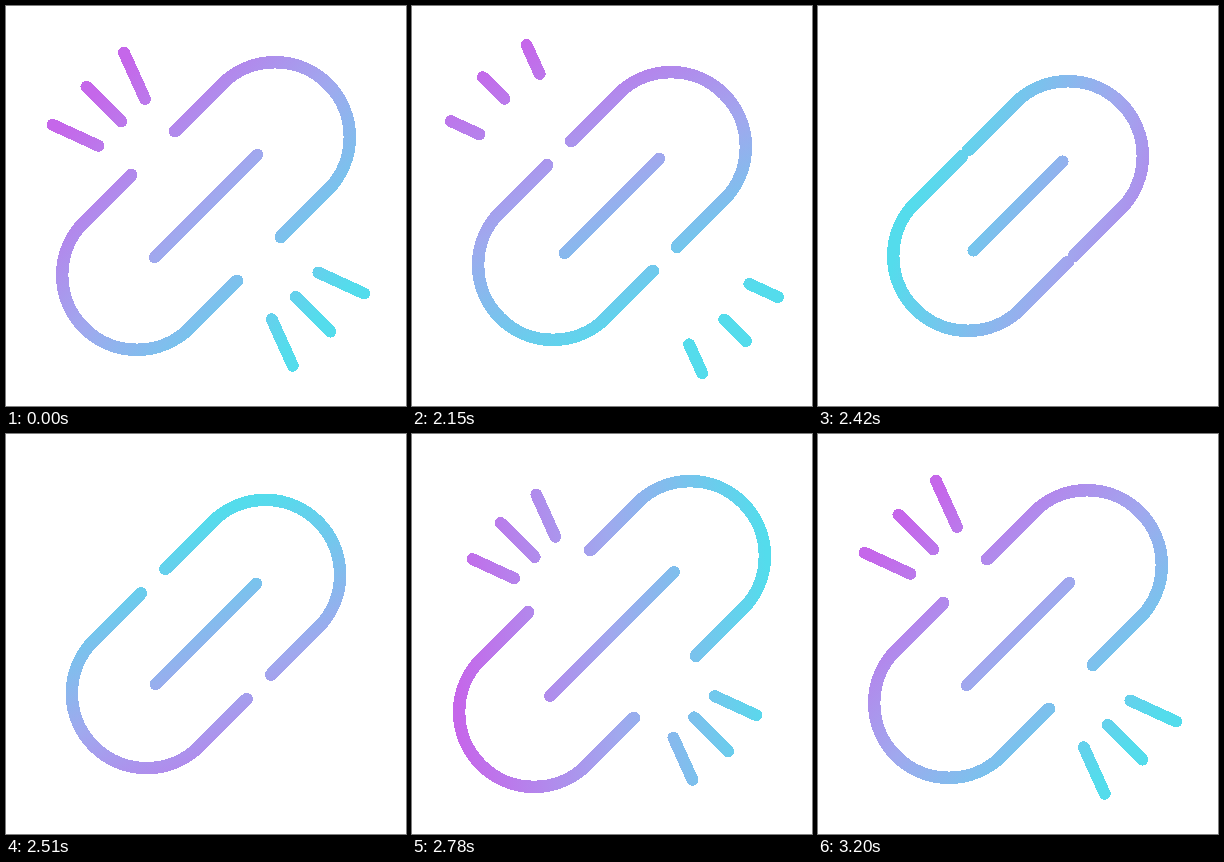
Write an HTML page that moves like this. It is 400 px wide and 400 px high and loops after 3230 ms.

```html
<!DOCTYPE html>
<html lang="en">
<head>
<meta charset="utf-8">
<title>Broken link</title>
<style>
  html, body { margin: 0; width: 100%; height: 100%; overflow: hidden; background: #fff; }
  svg { display: block; width: 100%; height: 100%; }
</style>
</head>
<body>
<svg viewBox="0 0 400 400" fill="none" stroke="url(#tint)" stroke-width="11.9" stroke-linecap="round" shape-rendering="crispEdges">
  <defs>
    <linearGradient id="tint" gradientUnits="userSpaceOnUse" x1="42" y1="200" x2="358" y2="200">
      <stop offset="0" stop-color="#c567ea"/>
      <stop offset=".5" stop-color="#a0a8ee"/>
      <stop offset="1" stop-color="#54dcec"/>
    </linearGradient>
  </defs>
  <path id="upper" stroke-width="12.5"/>
  <path id="lower" stroke-width="12.5"/>
  <path id="bar"/>
  <path id="rays"/>
</svg>
<script>
const LOOP = 3230, REST = 2000, STEP = 30, SPAN = 1200;
const $ = id => document.getElementById(id);
const tint = $('tint'), upper = $('upper'), lower = $('lower'), bar = $('bar'), rays = $('rays');

const clamp = u => Math.min(1, Math.max(0, u));
const mix = (a, b, u) => a + (b - a) * u;
const smooth = u => u * u * (3 - 2 * u);
const easeOut = u => 1 - (1 - u) ** 3;
const part = (t, from, to) => clamp((t - from) / (to - from));

// cubic-bezier(.32, 0, .38, 1)
function spin(x) {
  let lo = 0, hi = 1;
  for (let i = 0; i < 24; i++) {
    const m = (lo + hi) / 2, n = 1 - m;
    if (0.96 * m * n * n + 1.14 * n * m * m + m ** 3 < x) lo = m; else hi = m;
  }
  return smooth((lo + hi) / 2);
}

// rest -> closed -> wide open -> rest
function pulse(t, rest, closed, open) {
  if (t < 330) return mix(rest, closed, smooth(t / 330));
  if (t < 738) return mix(closed, open, smooth((t - 330) / 408));
  return mix(open, rest, smooth(part(t, 738, SPAN)));
}

// The gradient turns once and slides towards purple while the link is closed
function gradient(t) {
  const slide = 58 * (smooth(part(t, 0, 330)) - smooth(part(t, 450, 690)));
  return `rotate(${45 + 360 * spin(t / SPAN)} 200 200) translate(${-slide} 0)`;
}

// One half of the chain link; s = 1 is upper right, -1 lower left
function half(d, s) {
  const R = 74.8, K = R * Math.SQRT1_2, E = 2 * K - 100;
  const p = (x, y) => `${200 + s * (x + d)} ${200 + s * (y - d)}`;
  return `M${p(-100, -E)}L${p(-K, -K)}A${R} ${R} 0 0 1 ${p(K, K)}L${p(E, 100)}`;
}

// Inner end, direction, resting length and distance flown when leaving
const RAYS = [
  { x: 92.5, y: 139.8, ux: -0.909, uy: -0.417, len: 50.5, far: 73, grow: 1020 },
  { x: 115.2, y: 115.5, ux: -0.707, uy: -0.707, len: 49.2, far: 85, grow: 980 },
  { x: 139, y: 93, ux: -0.412, uy: -0.911, len: 51, far: 73, grow: 1020 }
];

function ray(r, t) {
  let tail, head;
  if (t < 360) {
    const u = smooth(t / 360);
    tail = mix(0, r.far, u);
    head = mix(r.len, r.far, u);
  } else {
    tail = mix(-31, 0, easeOut(part(t, 600, SPAN)));
    head = mix(-31, r.len, easeOut(part(t, 600, r.grow)));
  }
  if (head - tail < 0.5) return '';
  const x1 = r.x + r.ux * tail, y1 = r.y + r.uy * tail;
  const x2 = r.x + r.ux * head, y2 = r.y + r.uy * head;
  return `M${x1} ${y1}L${x2} ${y2}M${404.8 - x1} ${406.3 - y1}L${404.8 - x2} ${406.3 - y2}`;
}

function draw(ms) {
  const t = Math.max(0, Math.floor((ms - REST) / STEP)) * STEP;
  const d = pulse(t, 69, 46, 78.3);
  const h = pulse(t, 51.3, 42.2, 62.2);
  tint.setAttribute('gradientTransform', gradient(t));
  upper.setAttribute('d', half(d, 1));
  lower.setAttribute('d', half(d, -1));
  bar.setAttribute('d', `M${200 - h} ${200 + h}L${200 + h} ${200 - h}`);
  rays.setAttribute('d', RAYS.map(r => ray(r, t)).join(''));
}

const start = performance.now();
function tick() {
  draw((performance.now() - start) % LOOP);
  requestAnimationFrame(tick);
}
tick();
</script>
</body>
</html>
```
